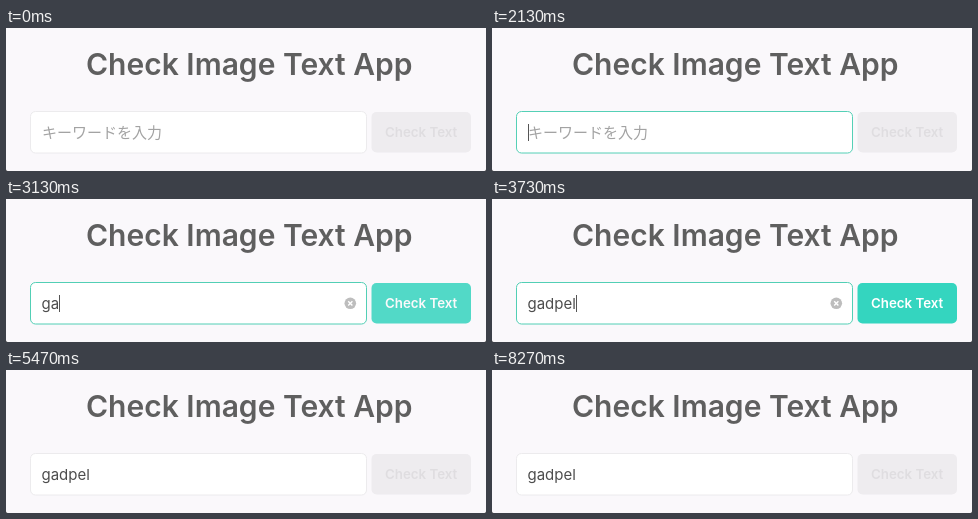
Write an HTML page that moves like this. It is 480x143 px and loops after 8390 ms.

```html
<!DOCTYPE html>
<html lang="ja">
<head>
<meta charset="utf-8">
<title>Check Image Text App</title>
<style>
  html, body { margin: 0; width: 100%; height: 100%; overflow: hidden; background: #faf8fb; }
  svg { display: block; width: 480px; height: 143px; }
  text { font-family: Inter, "Noto Sans", sans-serif; white-space: pre; }
  #title { font-size: 30px; font-weight: 600; fill: #5f5f5f; }
  #value { font-size: 15px; fill: #4d4d4d; }
  #hint { font-family: "Noto Sans CJK JP", "Noto Sans CJK", sans-serif; font-size: 15px; fill: #a3a3a3; }
  #label { font-size: 13.3px; font-weight: 600; }
</style>
</head>
<body>
<svg viewBox="0 0 480 143">
  <rect width="480" height="143" fill="#faf8fb"/>
  <path d="M0 141.5V143H1.5ZM480 141.5V143H478.5Z" fill="#777"/>
  <text id="title" x="80" y="47">Check Image Text App</text>
  <rect id="field" x="24.5" y="83.5" width="336" height="41.5" rx="5" fill="#fff"/>
  <text id="hint" x="36" y="110">キーワードを入力</text>
  <text id="value" x="35.5" y="110"></text>
  <rect id="caret" y="96" width="1" height="17" fill="#555"/>
  <g id="clear">
    <circle cx="344.3" cy="104.3" r="5.8" fill="#bdbdbd"/>
    <path d="M342.2 102.2l4.2 4.2m0-4.2l-4.2 4.2" stroke="#fff" stroke-width="1.4"/>
  </g>
  <rect id="button" x="365.5" y="84" width="99.5" height="40.5" rx="5"/>
  <text id="label" x="379" y="109">Check Text</text>
</svg>
<script>
const LOOP = 8390;
const WORD = 'gadpel';
const KEYS = [2870, 3130, 3270, 3400, 3530, 3670];
const FOCUS = 1930, BLUR = 5290;
const CARET_ON = [[1930, 2400], [2800, 4270], [4730, 5200]];

const GREY = { border: [236, 235, 237], fill: [238, 236, 239], label: [223, 221, 224] };
const TEAL = { border: [82, 207, 181], fill: [52, 213, 191], label: [255, 255, 255] };

const el = id => document.getElementById(id);
const [field, hint, value, caret, clear, button, label] =
  ['field', 'hint', 'value', 'caret', 'clear', 'button', 'label'].map(el);

const ramp = (t, start, length) => {
  const x = Math.min(1, Math.max(0, (t - start) / length));
  return x * x * (3 - 2 * x);
};
const mix = (key, k) =>
  `rgb(${GREY[key].map((c, i) => Math.round(c + (TEAL[key][i] - c) * k))})`;
const show = (node, on) => node.setAttribute('visibility', on ? 'visible' : 'hidden');

function draw(t) {
  const typed = KEYS.filter(k => t >= k).length;
  const out = 1 - ramp(t, BLUR, 170);
  const focus = ramp(t, FOCUS, 220) * out;
  const active = ramp(t, 2930, 270) * out;

  value.textContent = WORD.slice(0, typed);
  show(hint, !typed);
  show(clear, typed && t < BLUR + 40);
  show(caret, CARET_ON.some(([a, b]) => t >= a && t < b));
  caret.setAttribute('x', typed ? Math.round(35.5 + value.getComputedTextLength()) : 36);

  field.setAttribute('stroke', mix('border', focus));
  button.setAttribute('fill', mix('fill', active));
  label.setAttribute('fill', mix('label', active));
}

const start = performance.now();
function tick() {
  draw((performance.now() - start) % LOOP);
  requestAnimationFrame(tick);
}
draw(0);
requestAnimationFrame(tick);
</script>
</body>
</html>
```
